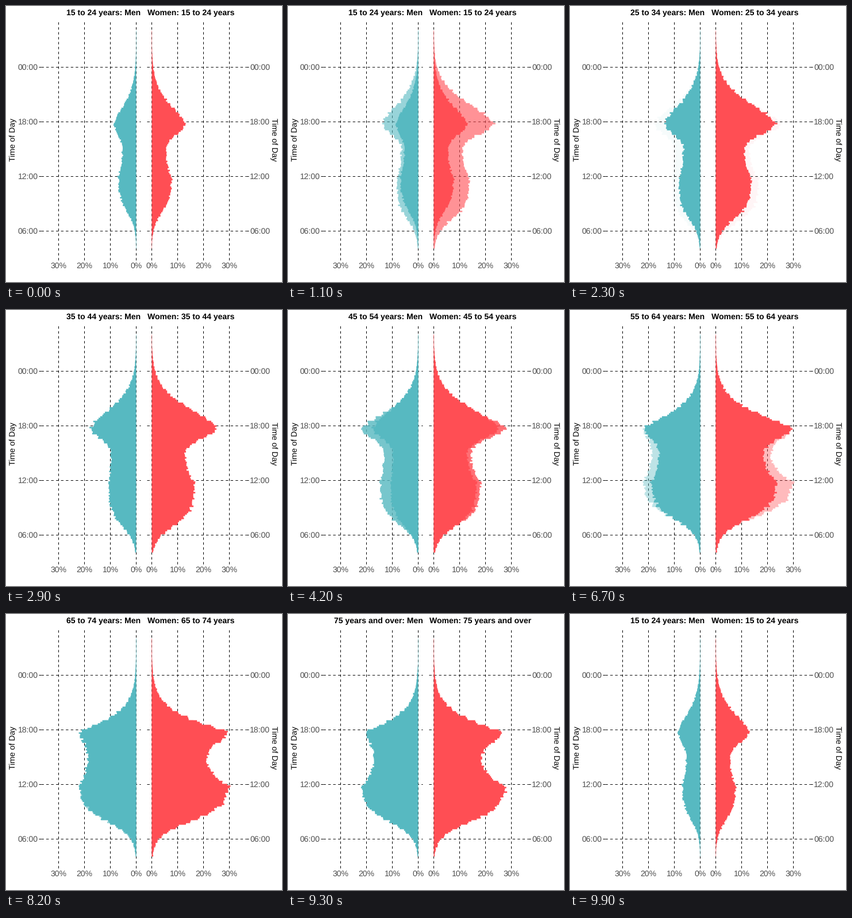
A matplotlib script that plays this animation: 480x480 px, repeating every 10000 ms.

```python
import numpy as np
import matplotlib.pyplot as plt
from matplotlib.animation import FuncAnimation
from matplotlib.patches import Polygon

SIZE, DPI = 480, 72
FRAMES, STEP_MS = 100, 100
TEAL, RED, GREY = "#57b9c1", "#ff4e54", "#4d4d4d"
PX, HOUR_PX = 4.5, 15.8     # pixels per percent and per hour
ZERO_M, ZERO_W = 226.5, 253.5
PAD, SPAN = 7.9, 157.5
TOP, BOTTOM = 23.6, 441

STARTS = (8, 23, 38, 51, 65, 79, 93)
FADE = 7                    # frames per transition

NOON, DIP, PEAK = 11.5, 14.5, 17.5
SLOTS = 4 + np.arange(144) / 6
rng = np.random.RandomState(7)

# name, hour of the morning rise, width of the evening fall,
# then (noon, dip, peak) in percent for men and women
GROUPS = [
    ("15 to 24 years", 7.8, 3.0, (7.0, 5.4, 8.6), (7.8, 5.6, 13.0)),
    ("25 to 34 years", 7.0, 3.3, (8.3, 6.5, 13.8), (13.8, 11.1, 23.3)),
    ("35 to 44 years", 6.7, 3.2, (10.6, 9.8, 17.5), (16.5, 13.0, 25.2)),
    ("45 to 54 years", 6.9, 2.7, (14.7, 13.2, 21.8), (18.3, 14.4, 27.8)),
    ("55 to 64 years", 7.4, 2.4, (19.0, 16.0, 21.6), (23.6, 18.6, 29.8)),
    ("65 to 74 years", 7.7, 2.0, (22.2, 18.8, 22.3), (30.0, 21.4, 29.8)),
    ("75 years and over", 7.6, 2.0, (22.0, 17.2, 20.3), (27.8, 18.5, 26.5)),
]


def hour_y(h):
    return 105.7 + (24 - h) * HOUR_PX


def share(h, rise, fall, levels):
    """Percent taking part at hour h: rise to noon, dip, peak, evening fall."""
    noon, dip, peak = levels
    morning = noon / (1 + np.exp((rise - h) / 0.85))
    lunch = dip + (noon - dip) * np.clip((DIP - h) / (DIP - NOON), 0, 1) ** 2
    u = np.clip((h - DIP) / (PEAK - DIP), 0, 1) ** 1.4
    climb = dip + (peak - dip) * u * u * (3 - 2 * u)
    late = np.clip(h - PEAK, 0, None) / fall
    evening = peak * np.exp(-late ** (1.2 + 0.33 * (fall - 2)))
    return np.select([h < NOON, h < DIP, h < PEAK],
                     [morning, lunch, climb], evening)


def profile(*params):
    """Ten-minute shares, half stepped at each half hour, with jitter."""
    held = share(np.floor(SLOTS * 2 + 1e-6) / 2, *params)
    v = (held + share(SLOTS, *params)) / 2
    return np.clip(v + 0.08 * np.sqrt(v) * rng.randn(len(v)), 0.1, None)


def outline(values, zero, sign):
    edges = hour_y(np.append(SLOTS, 28))
    x = zero + sign * PX * np.repeat(values, 2)
    y = np.repeat(edges, 2)[1:-1]
    return np.vstack([(zero, edges[0]), np.column_stack([x, y]),
                      (zero, edges[-1])])


states = [(name,
           outline(profile(rise, fall, men), ZERO_M, -1),
           outline(profile(rise, fall, women), ZERO_W, 1))
          for name, rise, fall, men, women in GROUPS]

plt.rcParams["font.family"] = "Liberation Sans"
plt.rcParams["font.size"] = 14
plt.rcParams["text.hinting"] = "none"
fig = plt.figure(figsize=(SIZE / DPI, SIZE / DPI), dpi=DPI, facecolor="white")
ax = fig.add_axes([0, 0, 1, 1])
ax.set_xlim(0, SIZE)
ax.set_ylim(SIZE, 0)
ax.axis("off")


def line(x0, y0, x1, y1, style=(0, (4.27, 4.27))):
    # half-pixel shift lands the snapped line on the intended pixel
    ax.plot([x0 - 0.5, x1 - 0.5], [y0 + 0.5, y1 + 0.5], color="black", lw=1,
            ls=style, zorder=1, dash_capstyle="butt", solid_capstyle="butt")


def label(x, y, text, ha="center", **style):
    return ax.text(x, y, text, ha=ha, va="baseline", **style)


def draw_panel(zero, sign):
    inner, outer = zero - sign * PAD, zero + sign * (SPAN + PAD)
    left, right = sorted((inner, outer))
    for pct in (0, 10, 20, 30):
        x = zero + sign * pct * PX
        line(x, BOTTOM, x, TOP)
        label(x, 456, f"{pct}%", color=GREY)
    for h in (6, 12, 18, 24):
        y = hour_y(h)
        line(left, y, right, y)
        line(outer, y, outer + sign * 3.5, y, style="-")
        label(outer + sign * 5.2, y + 5.3, f"{h % 24:02d}:00",
              ha="right" if sign < 0 else "left", color=GREY)


draw_panel(ZERO_M, -1)
draw_panel(ZERO_W, 1)
for x, angle in ((16, 90), (461.5, -90)):
    label(x, 232.5, "Time of Day", rotation=angle, rotation_mode="anchor")

title_m = label(234.4, 16, "", ha="right", weight="bold")
title_w = label(245.6, 16, "", ha="left", weight="bold")


def bar_layer(z):
    pair = [Polygon(states[0][i], closed=True, facecolor=c, lw=0, snap=False,
                    zorder=z) for i, c in ((1, TEAL), (2, RED))]
    for p in pair:
        ax.add_patch(p)
    return pair


base, fresh = bar_layer(2), bar_layer(3)


def locate(n):
    """Current state index and transition step (0 while holding)."""
    for i, start in enumerate(STARTS):
        if n < start:
            return i, 0
        if n < start + FADE - 1:
            return i, n - start + 1
    return 0, 0


def update(n):
    cur, k = locate(n)
    nxt = (cur + 1) % len(states)
    alpha = (1 - np.cos(np.pi * k / FADE)) / 2
    for i in (0, 1):
        base[i].set_xy(states[cur][i + 1])
        fresh[i].set_xy(states[nxt][i + 1])
        fresh[i].set_alpha(alpha)
        fresh[i].set_visible(k > 0)
    name = states[nxt if k > FADE / 2 + 1 else cur][0]
    title_m.set_text(f"{name}: Men")
    title_w.set_text(f"Women: {name}")
    return [*base, *fresh, title_m, title_w]


anim = FuncAnimation(fig, update, frames=FRAMES, interval=STEP_MS,
                     repeat=True, repeat_delay=0, blit=False)
plt.show()
```
